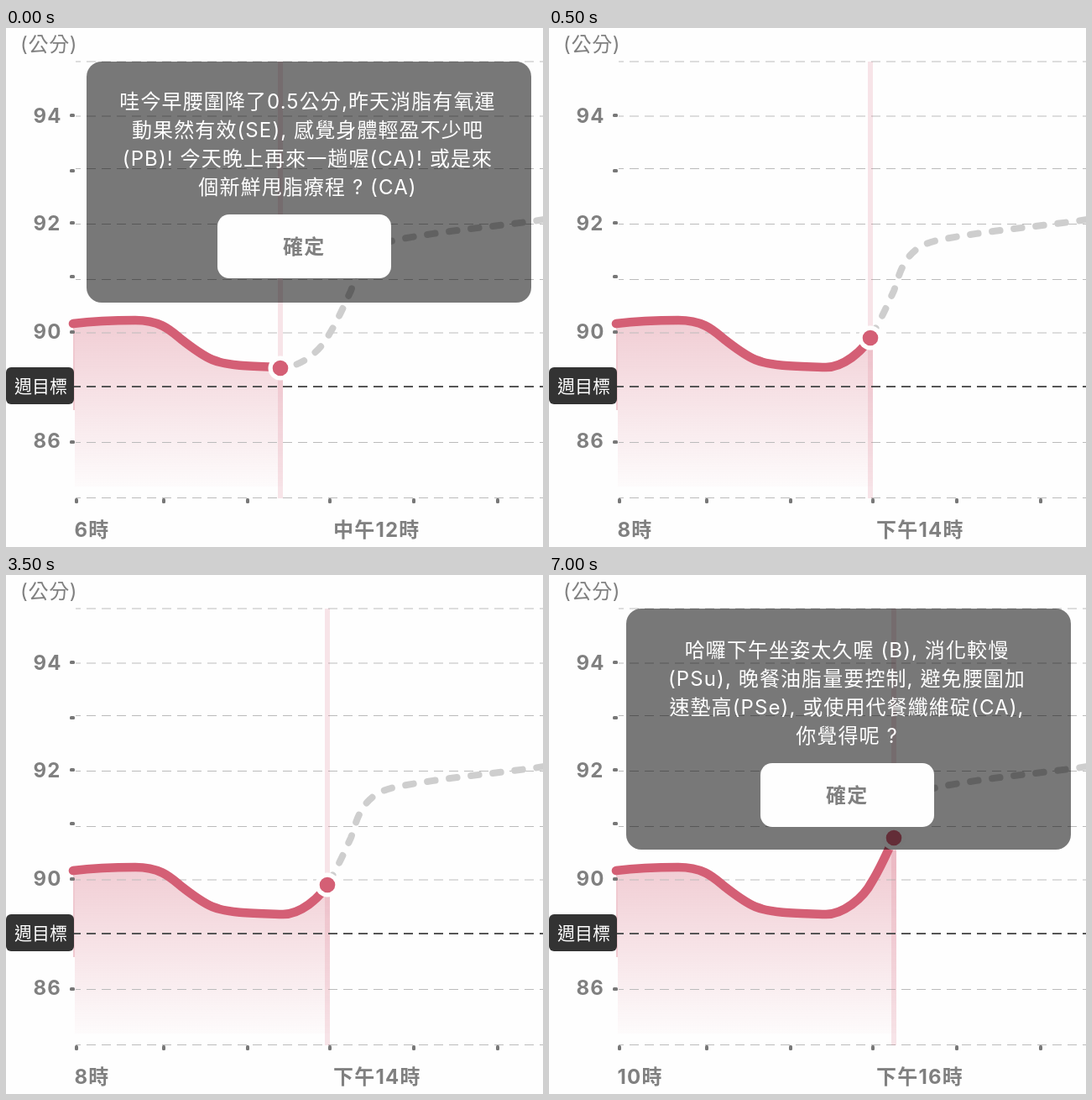
An HTML page for the animation above (8000 ms loop, 640 by 618 pixels).

```html
<!DOCTYPE html>
<html lang="zh-Hant">
<head>
<meta charset="utf-8">
<style>
  html, body { margin: 0; width: 100%; height: 100%; overflow: hidden; background: #fefefe; }
  svg { display: block; width: 640px; height: 618px; }
  text { font: 24px Inter, "Noto Sans CJK TC", "Noto Sans CJK", sans-serif; fill: #808080; letter-spacing: .7px; }
  .bold { font-weight: 700; letter-spacing: 1.2px; }
  .message { fill: #fff; letter-spacing: 1.1px; text-anchor: middle; }
</style>
</head>
<body>
<svg id="stage" viewBox="0 0 640 618">
  <defs>
    <linearGradient id="fade" gradientUnits="userSpaceOnUse" x1="0" y1="345" x2="0" y2="546">
      <stop stop-color="#d45f75" stop-opacity=".31"/>
      <stop offset="1" stop-color="#d45f75" stop-opacity=".02"/>
    </linearGradient>
  </defs>
</svg>
<script>
const DURATION = 8000;
const curve = `M641.5 228C590 236 520 241 462 253C422 262 418 294 411 313
  C404 328 396 347 385 365C374 386 350 404 330 404C296 403 266 403 246 395
  C234 390 222 381 208 370C196 360 184 348 154 348C128 348 104 349 80 352`;

const scenes = [
  { from: 0, dot: [327, 405], times: ['6時', '中午12時'],
    popup: { x: 96, textX: 359.5, shift: 0, lines: [
      '哇今早腰圍降了0.5公分,昨天消脂有氧運', '動果然有效(SE), 感覺身體輕盈不少吧',
      '(PB)! 今天晚上再來一趟喔(CA)! 或是來', '個新鮮甩脂療程 ? (CA)'] } },
  { from: 500, dot: [383, 369], times: ['8時', '下午14時'] },
  { from: 5500, dot: [411, 313], times: ['10時', '下午16時'],
    popup: { x: 92, textX: 355, shift: 2, lines: [
      '哈囉下午坐姿太久喔 (B), 消化較慢', '(PSu), 晚餐油脂量要控制, 避免腰圍加',
      '速墊高(PSe), 或使用代餐纖維碇(CA),', '你覺得呢 ?'] } }
];

const rect = (x, y, w, h, fill, r = 0) =>
  `<rect x="${x}" y="${y}" width="${w}" height="${h}" rx="${r}" fill="${fill}"/>`;
const label = (x, y, text, cls = 'bold', extra = '') =>
  `<text x="${x}" y="${y}" class="${cls}" ${extra}>${text}</text>`;

const grid = [40, 105, 167.5, 233.5, 299.5, 363, 493.5, 559.5].map(y =>
  `<path d="M83 ${y}H640" stroke="#bbb" stroke-width="1.2" stroke-dasharray="11 7" stroke-dashoffset="5"/>`).join('');

const axes = [[94, 113], [92, 241], [90, 370], [86, 500]].map(([n, y]) => label(32.5, y, n)).join('')
  + [104, 170, 232, 296, 362, 493].map(y => rect(76, y - 2, 6, 4, '#777', 1.5)).join('')
  + [84, 188, 288, 386, 486, 586].map(x => rect(x - 2, 560, 4, 6, '#777', 1.5)).join('')
  + label(17, 28, '(公分)', '')
  + '<path d="M81 427H640" stroke="#555" stroke-width="2" stroke-dasharray="11 7" stroke-dashoffset="3"/>'
  + rect(0, 404, 81, 44, '#333', 6)
  + label(10, 434, '週目標', '', 'style="font-size:21px;letter-spacing:0;fill:#fff"');

function popupMarkup({ x, textX, shift, lines }) {
  return rect(x, 40, 530, 287, 'rgba(0,0,0,.53)', 18)
    + lines.map((line, i) => label(textX, 96 + shift + i * 34, line, 'message')).join('')
    + rect(252, 222 + shift, 207, 76, '#fefefe', 14)
    + label(330, 269 + shift, '確定');
}

function sceneMarkup({ dot: [x, y], times, popup }, i) {
  return `<g class="scene">
    <clipPath id="past${i}"><rect width="${x}" height="618"/></clipPath>
    <clipPath id="filled${i}"><rect width="${x + 3}" height="618"/></clipPath>
    <clipPath id="future${i}"><rect x="${x}" width="640" height="618"/></clipPath>
    <path d="${curve}L82 352V546H641Z" fill="url(#fade)" clip-path="url(#filled${i})"/>
    ${rect(80, 352, 2, 103, '#f0c9d0')}
    ${grid}
    ${rect(x - 3, 40, 6, 520, 'rgba(212,95,117,.16)')}
    <g fill="none" stroke-linecap="round">
      <path d="${curve}" stroke="#cecece" stroke-width="8" stroke-dasharray="9.5 16.7" clip-path="url(#future${i})"/>
      <path d="${curve}" stroke="#d45f75" stroke-width="10.6" clip-path="url(#past${i})"/>
    </g>
    <circle cx="${x}" cy="${y}" r="14.5" fill="#fefefe"/>
    <circle cx="${x}" cy="${y}" r="9.3" fill="#d45f75"/>
    ${axes}
    ${label(81.5, 606, times[0])}${label(390, 606, times[1])}
    ${popup ? popupMarkup(popup) : ''}
  </g>`;
}

const stage = document.getElementById('stage');
stage.insertAdjacentHTML('beforeend', scenes.map(sceneMarkup).join(''));

// Each scene is opaque from its own start until the next one begins.
stage.querySelectorAll('.scene').forEach((group, i) => {
  const steps = scenes.map(({ from }, j) =>
    ({ offset: from / DURATION, opacity: Number(i === j), easing: 'step-end' }));
  steps.push({ offset: 1, opacity: steps.at(-1).opacity });
  group.animate(steps, { duration: DURATION, iterations: Infinity });
});
</script>
</body>
</html>
```
